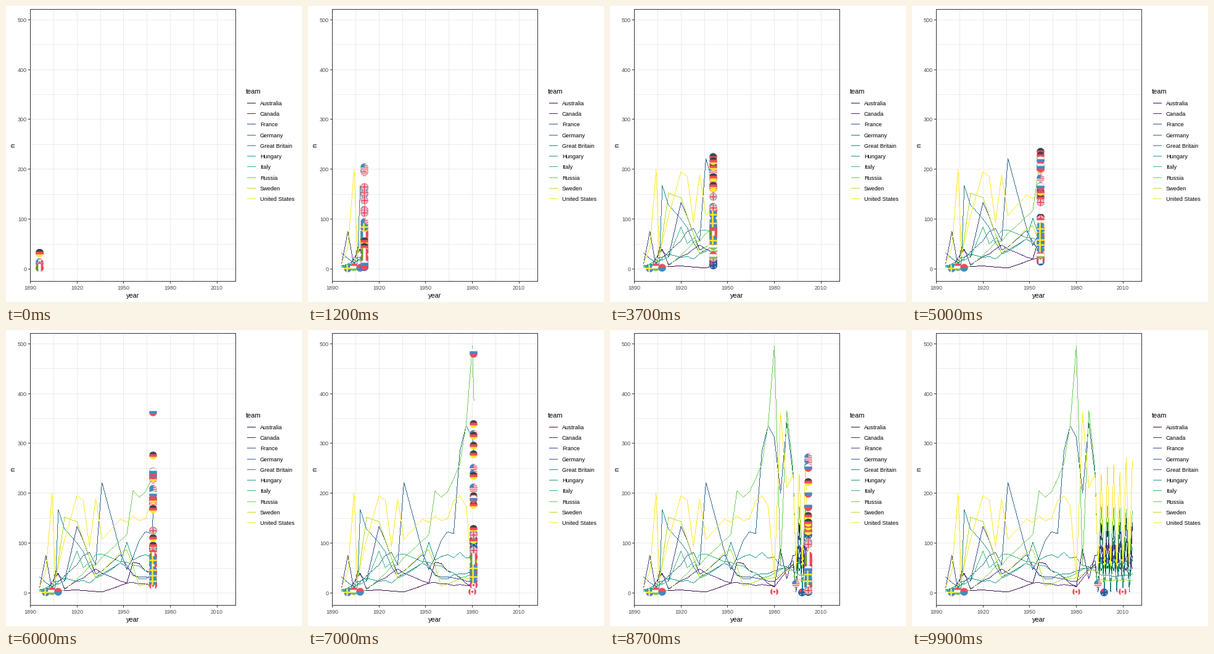
Write a matplotlib script that moves like this. It is 480 px wide and 480 px high and loops after 10 s.

```python
import numpy as np
import matplotlib.pyplot as plt
from matplotlib.animation import FuncAnimation

SIZE, FRAMES, PT = 480, 100, 0.72
LEFT, RIGHT, TOP, BOTTOM = 39, 372, 5, 446
plt.rcParams["font.family"] = ["Liberation Sans", "DejaVu Sans"]

RED, BLUE, NAVY = "#ED4C5C", "#428BC1", "#2A5F9E"
YELLOW, GREEN, LIME, BLACK, WHITE = "#FFE62E", "#699635", "#83BF4F", "#3E4347", "#FFFFFF"

SUMMER = [y for y in range(1896, 2017, 4) if y not in (1916, 1940, 1944)]
WINTER = list(range(1994, 2015, 4))
YEARS = sorted(SUMMER + WINTER + [1906])
MAX_SLOPE = 16.5

rng = np.random.default_rng(4)
teams = {}


def team(name, summer, winter, *keys):
    """Counts bend at the key points, then swing between summer and winter levels."""
    bends = dict(keys)
    pts = {}
    for year in YEARS:
        wobble = rng.uniform(0.9, 1.1)
        if year > 1992:
            level = winter if year in WINTER else summer
            if level:
                pts[year] = round(level * wobble)
        elif year >= keys[0][0]:
            n = np.interp(year, *zip(*keys))
            pts[year] = round(n if year in bends else n * wobble)
    teams[name] = pts


team("Australia", 140, 3, (1896, 3), (1920, 6), (1936, 2), (1952, 20), (1956, 62), (1980, 12),
     (1992, 57))
team("Canada", 45, 70, (1900, 2), (1908, 40), (1912, 8), (1932, 48), (1952, 20), (1980, 14),
     (1984, 88), (1988, 28), (1992, 75))
team("France", 70, 15, (1896, 11), (1900, 75), (1904, 3), (1906, 45), (1912, 25), (1920, 133),
     (1932, 38), (1948, 77), (1956, 35), (1980, 24), (1992, 65))
team("Germany", 130, 50, (1896, 32), (1904, 12), (1928, 81), (1932, 57), (1936, 222), (1952, 47),
     (1964, 123), (1968, 119), (1972, 285), (1976, 336), (1980, 312), (1984, 200), (1988, 342),
     (1992, 238))
team("Great Britain", 100, 5, (1896, 7), (1906, 10), (1908, 167), (1912, 128), (1920, 100),
     (1932, 32), (1948, 60), (1960, 28), (1992, 52))
team("Hungary", 35, None, (1896, 5), (1912, 30), (1928, 20), (1948, 60), (1952, 102), (1956, 66),
     (1972, 81), (1992, 45))
team("Italy", 72, 20, (1896, 3), (1912, 24), (1920, 84), (1924, 51), (1932, 77), (1952, 62),
     (1972, 30), (1992, 52))
team("Russia", 160, 45, (1908, 3), (1912, 6), (1952, 117), (1956, 205), (1968, 229), (1972, 260),
     (1976, 338), (1980, 496), (1984, 56), (1988, 366), (1992, 250))
team("Sweden", 25, 25, (1900, 1), (1906, 24), (1912, 152), (1920, 143), (1932, 30), (1952, 87),
     (1960, 14), (1992, 45))
team("United States", 256, 55, (1896, 13), (1900, 43), (1904, 200), (1906, 24), (1912, 107),
     (1920, 195), (1924, 186), (1928, 93), (1932, 189), (1936, 108), (1948, 148), (1960, 145),
     (1972, 195), (1976, 175), (1980, 30), (1984, 361), (1988, 212), (1992, 238))

STILL = [("Sweden", 1900, 1), ("Hungary", 1904, 4), ("Two-tone", 1908, 2), ("Canada", 1980, 2),
         ("United States", 1994, 18), ("Australia", 1998, 1), ("Canada", 2010, 2)]


def px(year):
    return LEFT + (year - 1890) * (RIGHT - LEFT) / 132


def py(n):
    return BOTTOM - (n + 24.8) * (BOTTOM - TOP) / 545.6


def rgb(color):
    return np.array([int(color[i:i + 2], 16) for i in (1, 3, 5)]) / 255


def make_flag(name, width=13, sub=8, radius=6.3):
    axis = (np.arange(width * sub) + 0.5) / sub - width / 2
    u, v = np.meshgrid(axis / radius, axis / radius)
    img = np.ones(u.shape + (3,))

    def fill(mask, color):
        img[mask] = rgb(color)

    def bands(w, *colors):
        for i, c in enumerate(colors):
            fill(w >= -1 + i * 2 / len(colors), c)

    def cross(arm, color, x=0.0):
        fill((abs(u - x) < arm) | (abs(v) < arm), color)

    if name == "France":
        bands(u, BLUE, WHITE, RED)
    elif name == "Italy":
        bands(u, GREEN, WHITE, RED)
    elif name == "Germany":
        bands(v, BLACK, RED, YELLOW)
    elif name == "Hungary":
        bands(v, RED, WHITE, LIME)
    elif name == "Russia":
        bands(v, WHITE, BLUE, RED)
    elif name == "Two-tone":
        bands(v, RED, BLUE)
    elif name == "Sweden":
        fill(u > -2, BLUE)
        cross(0.2, YELLOW, -0.15)
    elif name == "Canada":
        fill(abs(u) > 0.52, RED)
        fill(abs(u) + abs(v) < 0.36, RED)
    elif name == "Great Britain":
        fill(u > -2, NAVY)
        diagonal = abs(abs(u) - abs(v))
        fill(diagonal < 0.22, WHITE)
        fill(diagonal < 0.08, RED)
        cross(0.34, WHITE)
        cross(0.18, RED)
    elif name == "United States":
        fill(np.floor((v + 1) * 4.5) % 2 == 0, RED)
        fill((u < 0.05) & (v < 0.05), BLUE)
    elif name == "Australia":
        fill(u > -2, NAVY)
        fill((u < 0) & (v < 0) & ((abs(u + 0.45) < 0.12) | (abs(v + 0.4) < 0.12)), RED)
        for x, y in [(-0.4, 0.5), (0.45, -0.45), (0.5, 0.4)]:
            fill(np.hypot(u - x, v - y) < 0.13, WHITE)

    inside = (np.hypot(u, v) <= 1).astype(float)
    full = np.dstack([img * inside[..., None], inside])
    return full.reshape(width, sub, width, sub, 4).mean(axis=(1, 3))


def build_routes():
    """Flags glide between nearby games; from a peak they also make long trips."""
    routes = []
    for name in ["United States", *list(teams)[:-1]]:
        pts = teams[name]
        for games in (SUMMER, WINTER):
            own = [y for y in games if y in pts]
            for i, a in enumerate(own):
                near = [pts[y] for y in own[max(i - 1, 0):i + 2]]
                peak = pts[a] == max(near)
                for step in (1, 2, 3, 6, 12, 18, 24) if peak else (1, 2):
                    if i + step < len(own):
                        b = own[i + step]
                        if abs(pts[b] - pts[a]) <= MAX_SLOPE * (b - a):
                            routes.append((name, a, b))
    return routes


colors = {name: plt.cm.viridis(i / 9)[:3] for i, name in enumerate(teams)}
flags = {name: make_flag(name) for name in [*teams, "Two-tone"]}
routes = build_routes()

fig = plt.figure(figsize=(SIZE / 100, SIZE / 100), dpi=100, facecolor="white")
ax = fig.add_axes([0, 0, 1, 1])
base = np.ones((SIZE, SIZE, 3))


def trace(canvas, x0, y0, x1, y1, color):
    """Crisp line, one pixel wide."""
    count = int(max(abs(x1 - x0), abs(y1 - y0))) + 2
    xs = np.rint(np.linspace(x0, x1, count)).astype(int)
    ys = np.rint(np.linspace(y0, y1, count)).astype(int)
    canvas[ys, xs] = color


def label(x, y, text, size, color="black", **kw):
    ax.text(x, y, text, fontsize=size * PT, color=color, **kw)


GRID, EDGE, GRAY = rgb("#EBEBEB"), rgb("#333333"), "#4D4D4D"
for year in range(1890, 2011, 15):
    x = px(year)
    trace(base, x, TOP, x, BOTTOM, GRID)
    if year % 30 == 0:
        trace(base, x, BOTTOM + 1, x, BOTTOM + 3, EDGE)
        label(x + 0.3, 460, str(year), 9, GRAY, ha="center")
for n in range(0, 501, 50):
    y = py(n)
    trace(base, LEFT, y, RIGHT, y, GRID)
    if n % 100 == 0:
        trace(base, LEFT - 3, y, LEFT - 1, y, EDGE)
        label(34, y + 4, str(n), 9, GRAY, ha="right")
label(206, 473, "year", 11, ha="center")
label(11.5, 225.5, "n", 11, ha="center", va="center", rotation=90)
label(389, 142, "team", 11)
for i, name in enumerate(teams):
    y = 156.8 + 17.28 * i
    trace(base, 391, y, 404, y, colors[name])
    label(412, y + 3.9, name, 9.3)

stage = ax.imshow(base, extent=(0, SIZE, SIZE, 0), interpolation="nearest", aspect="auto")
ax.set(xlim=(0, SIZE), ylim=(SIZE, 0))
ax.axis("off")


def stamp(canvas, name, year, n):
    flag = flags[name]
    w = flag.shape[0]
    x = int(px(year)) - w // 2
    y = round(py(n)) - w // 2
    spot = canvas[y:y + w, x:x + w]
    spot *= 1 - flag[..., 3:]
    spot += flag[..., :3]


def draw(frame):
    now = 1896 - (-120 * frame // (FRAMES - 1))
    canvas = base.copy()
    for name, pts in teams.items():
        years = [y for y in pts if y <= now]
        if years and years[-1] < now:
            years.append(now)
        counts = np.rint(np.interp(years, list(pts), list(pts.values())))
        spots = [(px(y), py(n)) for y, n in zip(years, counts)]
        for p, q in zip(spots, spots[1:]):
            trace(canvas, *p, *q, colors[name])

    for name, year, n in STILL:
        if year <= now:
            stamp(canvas, name, year, n)
    for name, a, b in routes:
        if a <= now < b:
            stamp(canvas, name, now, np.interp(now, [a, b], [teams[name][a], teams[name][b]]))

    canvas[[TOP, BOTTOM], LEFT:RIGHT + 1] = EDGE
    canvas[TOP:BOTTOM + 1, [LEFT, RIGHT]] = EDGE
    stage.set_data(np.clip(canvas, 0, 1))
    return [stage]


anim = FuncAnimation(fig, draw, frames=FRAMES, interval=100, repeat=True, repeat_delay=0,
                     blit=False)
plt.show()
```
